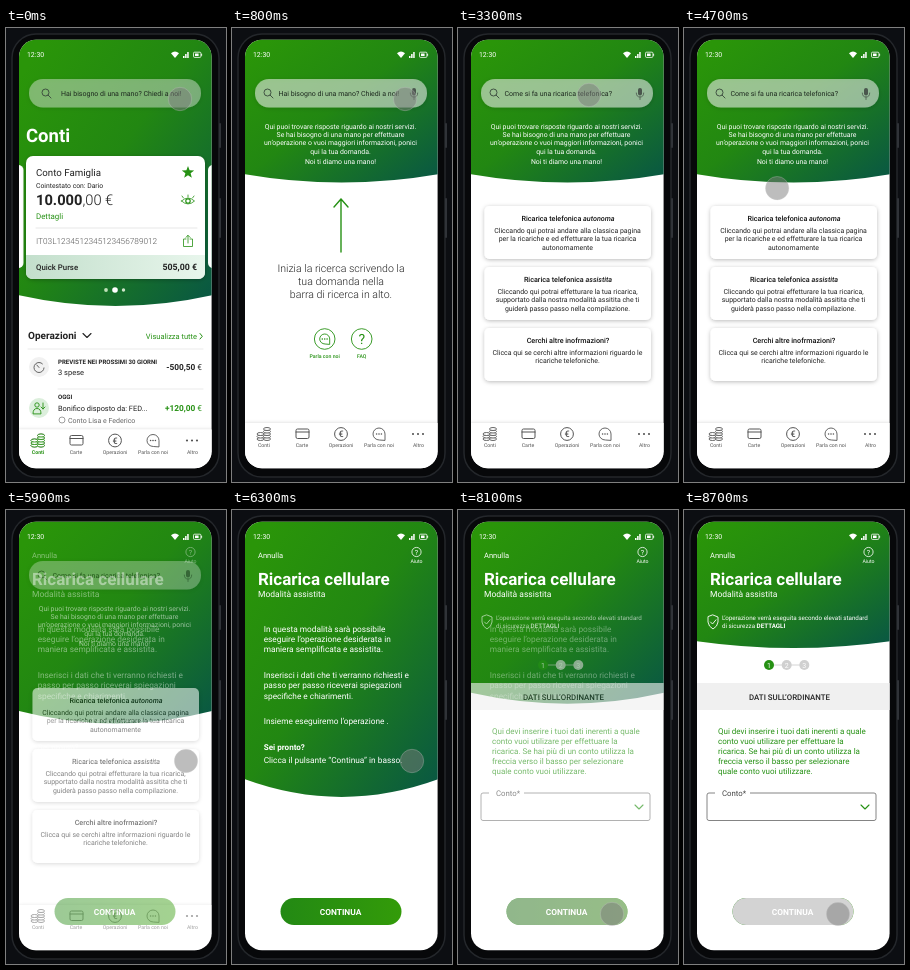
Recreate the animation shown at these times as an HTML page. Size 220 by 454 pixels, loop 8.8 s.

```html
<!DOCTYPE html>
<html lang="it">
<head>
<meta charset="utf-8">
<title>Ricarica cellulare</title>
<style>
html, body { margin: 0; width: 100%; height: 100%; overflow: hidden; background: #0c0e12; }
svg { display: block; width: 100vw; height: 100vh; }
text { font-family: Roboto, sans-serif; white-space: pre; text-rendering: geometricPrecision; }
</style>
</head>
<body>
<svg id="stage" viewBox="0 0 220 454"></svg>
<script>
const LOOP = 8800;
const GREEN = '#269114', INK = '#222';

// Markup helpers
const text = (x, y, size, str, fill = INK, weight = 400, anchor = 'start', extra = '') =>
  `<text x="${x}" y="${y}" font-size="${size}" fill="${fill}" font-weight="${weight}" text-anchor="${anchor}" ${extra}>${str}</text>`;
const lines = (x, y, step, size, rows, fill, weight, anchor) =>
  rows.map((row, i) => text(x, y + i * step, size, row, fill, weight, anchor)).join('');
const rect = (x, y, w, h, r, fill, extra = '') =>
  `<rect x="${x}" y="${y}" width="${w}" height="${h}" rx="${r}" fill="${fill}" ${extra}/>`;
const circle = (x, y, r, fill, extra = '') => `<circle cx="${x}" cy="${y}" r="${r}" fill="${fill}" ${extra}/>`;
const line = (d, color, w = 1) =>
  `<path d="${d}" fill="none" stroke="${color}" stroke-width="${w}" stroke-linecap="round" stroke-linejoin="round"/>`;
const group = (id, body) => `<g id="${id}">${body}</g>`;
const at = (x, y, body) => `<g transform="translate(${x} ${y})">${body}</g>`;
const bold = s => `<tspan font-weight="700">${s}</tspan>`;
const italic = s => `<tspan font-style="italic">${s}</tspan>`;

// Icons
const chat = (x, y, c, r = 6) => at(x, y,
  line(`M${r} ${r} L${r} 0 A${r} ${r} 0 1 0 0 ${r} Z`, c, .9) +
  [-2.4, 0, 2.4].map(dx => circle(dx, 0, .8, c)).join(''));
const coins = (x, y, c) => at(x, y, [[-3.5, 5], [-3.5, 2.5], [-3.5, 0], [3, 5], [3, 2.5], [3, 0], [3, -2.5], [3, -5]]
  .map(([dx, dy]) => `<ellipse cx="${dx}" cy="${dy}" rx="3.5" ry="1.5" fill="#fff" stroke="${c}" stroke-width=".9"/>`).join(''));
const chevron = (x, y, c, s = 4) => line(`M${x - s} ${y - s / 2} L${x} ${y + s / 2} L${x + s} ${y - s / 2}`, c, 1.1);
const star = (x, y, r) => {
  const pts = Array.from({ length: 10 }, (_, i) => {
    const a = i * Math.PI / 5 - Math.PI / 2, q = i % 2 ? r * .42 : r;
    return `${x + q * Math.cos(a)},${y + q * Math.sin(a)}`;
  });
  return `<polygon points="${pts.join(' ')}" fill="${GREEN}"/>`;
};
const eye = (x, y) => at(x, y,
  line('M-6.5 0 Q0 -6 6.5 0 Q0 6 -6.5 0 Z M-4.5 -3 L-6 -5 M0 -4 V-6 M4.5 -3 L6 -5', GREEN, .8) +
  circle(0, 0, 2.2, 'none', `stroke="${GREEN}" stroke-width="1.2"`));
const glass = (x, y) => circle(x - 1, y - 1, 3.5, 'none', 'stroke="#38483c" stroke-width=".9"') +
  line(`M${x + 1.6} ${y + 1.6} L${x + 4.5} ${y + 4.5}`, '#38483c', .9);

const status = text(21, 29.3, 6.9, '12:30', '#fff') +
  '<path d="M165 25.3 Q169 21.8 173 25.3 L169 30 Z" fill="#fff"/>' +
  [0, 1, 2].map(i => rect(177 + i * 2.1, 28 - i * 2, 1.5, 2 + i * 2, 0, '#fff')).join('') +
  rect(187.5, 24.2, 7.4, 5.2, 1, 'none', 'stroke="#fff" stroke-width=".8"') +
  rect(189, 25.5, 3.6, 2.6, .3, '#fff') + rect(195.2, 25.8, .9, 2, 0, '#fff');

const home =
  text(20, 114, 18.5, 'Conti', '#fff', 700) +
  rect(6, 137, 11.5, 103, 5, '#fff') + rect(202, 137, 12, 103, 5, '#fff') +
  rect(20, 128, 179, 123, 7, '#fff', 'filter="url(#shadow)"') +
  '<path d="M20 227 H199 V244 Q199 251 192 251 H27 Q20 251 20 244 Z" fill="url(#strip)"/>' +
  text(30, 148, 9.7, 'Conto Famiglia') +
  text(30, 160, 6.8, 'Cointestato con: Dario') +
  text(30, 177, 14.7, bold('10.000') + ',00 €', INK, 300) +
  text(30, 191, 7.9, 'Dettagli', GREEN) +
  line('M30 200 H191', '#ddd', .7) +
  text(30, 216, 8.25, 'IT03L1234512345123456789012', '#555', 300) +
  text(30, 242, 7.8, 'Quick Purse', INK, 500) +
  text(191, 242, 8.8, '505,00 €', INK, 700, 'end') +
  star(182, 144.5, 6.5) + eye(182, 173) +
  line('M180 211 H177.5 V218.5 H186.5 V211 H184 M182 215 V207.5 M179.8 209.5 L182 207.3 L184.2 209.5', GREEN, .8) +
  circle(100, 262, 1.9, '#bfe0b8') + circle(109, 262, 2.8, '#fff') + circle(117.5, 262, 1.7, '#cfe6ca') +
  text(22, 311, 10, 'Operazioni', INK, 700) + chevron(81, 307.5, INK) +
  text(191, 311, 7.5, 'Visualizza tutte', GREEN, 400, 'end') +
  line('M194 305.5 L196.3 308.3 L194 311', GREEN) +
  line('M22 321 H197 M52 361 H197', '#e3e3e3', .7) +
  circle(33, 339, 10, '#f1f1f1') + circle(33, 339.5, 5, 'none', 'stroke="#555" stroke-width=".9" stroke-dasharray="27 4"') +
  line('M33 339.5 L30.8 337', '#555', .9) +
  text(52, 336, 6.1, 'PREVISTE NEI PROSSIMI 30 GIORNI', INK, 700) +
  text(52, 347, 7.5, '3 spese') + text(196, 342, 8.3, bold('-500,50') + ' €', INK, 400, 'end') +
  circle(33, 380, 10, '#dcefdc') + circle(31, 377, 2.2, 'none', `stroke="${GREEN}" stroke-width=".9"`) +
  line('M27 385.5 Q27 380.5 31 380.5 Q35 380.5 35 385.5 Z M37 375 V381 M35 379 L37 381 L39 379', GREEN, .9) +
  text(52, 371, 6.1, 'OGGI', INK, 700) +
  text(52, 383, 7.4, 'Bonifico disposto da: FED...') +
  text(196, 383, 8.3, bold('+120,00') + ' €', GREEN, 400, 'end') +
  circle(56, 392, 3, 'none', 'stroke="#888" stroke-width=".8"') + text(62, 395, 7, 'Conto Lisa e Federico', '#666');

const intro = lines(108.5, 100.5, 8.4, 6.9, ['Qui puoi trovare risposte riguardo ai nostri servizi.',
  'Se hai bisogno di una mano per effettuare', 'un’operazione o vuoi maggiori informazioni, ponici',
  'qui la tua domanda.'], '#fff', 400, 'middle') + text(108.5, 135.5, 6.9, 'Noi ti diamo una mano!', '#fff', 400, 'middle');

const hint = line('M109 224 V171 M102 179 L109 171 L116 179', GREEN, 1.4) +
  lines(109, 243.5, 13, 10.6, ['Inizia la ricerca scrivendo la', 'tua domanda nella', 'barra di ricerca in alto.'], INK, 300, 'middle') +
  [92.7, 129.7].map(x => circle(x, 311, 10.3, '#fff', `stroke="${GREEN}" stroke-width=".9"`)).join('') +
  chat(92.7, 311, GREEN, 5) + text(129.7, 316, 14, '?', GREEN, 400, 'middle') +
  text(92.7, 330, 5.2, 'Parla con noi', GREEN, 500, 'middle') + text(129.7, 330, 5.2, 'FAQ', GREEN, 500, 'middle');

const recent = rect(23, 80, 170.5, 88, 8, 'url(#drop)', 'filter="url(#shadow)"') +
  text(40, 94.3, 6.8, 'Ricerche recenti', '#111', 700) +
  ['Come fare un bonifico?', 'Quali sono gli orari della filiare di Roma?', 'Quali operazioni posso efettuare in filiare?']
    .map((s, i) => text(39.5, 111 + i * 21.5, 6.9, s, '#111', 400, 'start', 'font-style="italic" text-decoration="underline"')).join('');

const card = (y, title, rows) => rect(26.5, y, 166.5, 53, 5, '#fff', 'filter="url(#shadow)"') +
  text(110, y + 14.5, 7.2, title, '#111', 500, 'middle') + lines(109.5, y + 27, 8.3, 6.95, rows, INK, 400, 'middle');
const cards =
  card(178, 'Ricarica telefonica ' + italic('autonoma'),
    ['Cliccando qui potrai andare alla classica pagina', 'per la ricariche e ed effetturare la tua ricarica', 'autonomamente']) +
  card(239, 'Ricarica telefonica ' + italic('assistita'),
    ['Cliccando qui potrai effetturare la tua ricarica,', 'supportato dalla nostra modalità assitita che ti', 'guiderà passo passo nella compilazione.']) +
  card(300, 'Cerchi altre inofrmazioni?', ['Clicca qui se cerchi altre informazioni riguardo le', 'ricariche telefoniche.']);

const bar = rect(23, 51, 172, 28.5, 14, '#e9efe9', 'id="pill" filter="url(#shadow)"') +
  group('lens', glass(36.5, 65.5)) +
  group('mic', rect(180, 60, 4, 7.5, 2, '#4a564d') + line('M178.3 65 Q178.3 69 182 69 Q185.7 69 185.7 65 M182 69 V71.5', '#4a564d', .8)) +
  group('ask', text(46.5, 67.8, 7, 'Hai bisogno di una mano? Chiedi a noi!', '#1d291f')) +
  group('query', text(46.5, 67.8, 7, 'Come si fa una ricarica telefonica?', '#1d291f'));

const label = (x, s, c = '#555', w = 400) => text(x, 419, 5.2, s, c, w, 'middle');
const nav = rect(12, 395, 195, 60, 0, '#fff', 'filter="url(#shadow)"') + coins(32, 406, '#555') +
  group('active', coins(32, 406, GREEN) + label(32, 'Conti', GREEN, 700)) +
  rect(64, 401, 13, 9.5, 1.5, 'none', 'stroke="#555" stroke-width="1"') + line('M64 404 H77', '#555', 1.2) +
  circle(109, 406, 6.4, 'none', 'stroke="#555" stroke-width="1"') + text(109, 409.3, 9, '€', '#555', 500, 'middle') +
  chat(147, 406, '#555') + [181, 186, 191].map(x => circle(x, 406, 1.1, '#555')).join('') +
  group('idle', label(32, 'Conti')) + label(70, 'Carte') + label(109, 'Operazioni') + label(147, 'Parla con noi') + label(186.5, 'Altro');

const head = text(26, 48, 7.5, 'Annulla', '#fff') +
  circle(184.5, 42, 4.6, 'none', 'stroke="#fff" stroke-width=".8"') + text(184.5, 44.6, 7, '?', '#fff', 400, 'middle') +
  text(184.5, 53, 5.2, 'Aiuto', '#fff', 400, 'middle') +
  text(26, 75, 17, 'Ricarica cellulare', '#fff', 700) + text(26, 87.3, 8.5, 'Modalità assistita', '#fff') +
  rect(48.5, 388, 121, 27, 13.5, 'url(#go)') + rect(48.5, 388, 121, 27, 13.5, '#d3d3d3', 'id="off"') +
  text(108.5, 404.6, 8.4, 'CONTINUA', '#fff', 700, 'middle');

const guide = lines(31.7, 122, 10.2, 8.3, ['In questa modalità sarà possibile', 'eseguire l’operazione desiderata in', 'maniera semplificata e assistita.'], '#fff') +
  lines(31.7, 168, 10.3, 8.3, ['Inserisci i dati che ti verranno richiesti e', 'passo per passo riceverai spiegazioni', 'specifiche e chiarimenti.'], '#fff') +
  text(31.7, 214, 8.3, 'Insieme eseguiremo l’operazione .', '#fff') +
  text(31.7, 240, 8.1, 'Sei pronto?', '#fff', 700) + text(31.7, 253, 8.3, 'Clicca il pulsante “Continua” in basso.', '#fff');

const form = at(29, 112, line('M0 -7 L5 -5 V0 Q4.5 4.5 0 7 Q-4.5 4.5 -5 0 V-5 Z M-2.5 0 L-.5 2 L3 -2.2', '#fff', .9)) +
  text(38, 110, 6.25, 'L’operazione verrà eseguita secondo elevati standard', '#fff') +
  text(38, 117.5, 6.25, 'di sicurezza ' + bold('DETTAGLI'), '#fff') +
  line('M90 155 H116', '#c9c9c9', .8) +
  [85, 102.7, 120.3].map((x, i) => circle(x, 155, 5, i ? '#d0d0d0' : GREEN) + text(x, 157.5, 7, i + 1, '#fff', 400, 'middle')).join('') +
  rect(12, 173, 195, 27, 0, '#f0f0f0') + text(105.5, 189.5, 7.85, 'DATI SULL’ORDINANTE', INK, 500, 'middle') +
  lines(34, 224, 9.9, 8, ['Qui devi inserire i tuoi dati inerenti a quale', 'conto vuoi utilizare per effettuare la',
    'ricarica. Se hai più di un conto utilizza la', 'freccia verso il basso per selezionare',
    'quale conto vuoi utilizzare.'], GREEN) +
  rect(23, 283, 169, 27.5, 2, '#fff', 'stroke="#777" stroke-width=".9"') + rect(31, 281, 35, 4, 0, '#fff') +
  text(38, 286, 7.8, 'Conto*', '#444') + chevron(181, 297, GREEN);

const stop = (o, c) => `<stop offset="${o}" stop-color="${c}"/>`;
const grad = (id, dir, ...stops) => `<linearGradient id="${id}" ${dir}>${stops.join('')}</linearGradient>`;
document.getElementById('stage').innerHTML = `<defs>
  ${grad('green', 'x1=".1" y1=".05" x2="1" y2=".92"', stop(0, '#2a9509'), stop(.45, '#228712'), stop(1, '#0a5941'))}
  ${grad('strip', '', stop(0, '#c3dfcc'), stop(1, '#e8f6ec'))}
  ${grad('drop', 'x1="0" y1="0" x2=".15" y2="1"', stop(0, '#c6dfc6'), stop(.7, '#cfe5d4'), stop(1, '#e6f3ea'))}
  ${grad('go', '', stop(0, '#238914'), stop(1, '#339b09'))}
  <clipPath id="screen"><rect x="13" y="11.7" width="192.6" height="428.6" rx="17"/></clipPath>
  <filter id="shadow" x="-10%" y="-30%" width="120%" height="170%"><feDropShadow dx="0" dy="1" stdDeviation="2" flood-opacity=".27"/></filter></defs>` +
  rect(0, 0, 220, 454, 0, '#0c0e12') + rect(6, 6, 207, 443, 24, '#07080a', 'stroke="#24272b" stroke-width="1.5"') +
  rect(213, 95, 2, 25, 1, '#303338') + rect(213, 170, 2, 40, 1, '#303338') +
  `<g clip-path="url(#screen)">${rect(12, 10, 195, 432, 0, '#fff')}<path id="hero" fill="url(#green)"/>` +
  status + group('home', home) + group('intro', intro) + group('hint', hint) + group('cards', cards) +
  group('recent', recent) + group('bar', bar) + group('nav', nav) +
  group('head', head) + group('guide', guide) + group('form', form) +
  circle(0, 0, 11.7, '#7c7c7c', 'id="touch" fill-opacity=".5" stroke="#d5d5d5" stroke-opacity=".35" stroke-width=".8"') + '</g>';

const el = {};
document.querySelectorAll('#stage [id]').forEach(n => el[n.id] = n);

// time, x, y of the touch point
const path = [[0, 174, 71], [900, 173, 71], [1700, 151, 65], [2300, 150, 65], [3300, 131, 67], [3600, 118, 66], [3900, 98, 62],
  [4500, 98, 135], [4700, 93, 160], [5250, 174, 258], [5500, 180, 251], [6350, 180, 251], [7100, 165, 391], [7200, 154, 404], [LOOP, 154, 404]];

const ease = (t, a, b) => {
  const u = Math.min(1, Math.max(0, (t - a) / (b - a)));
  return u * u * (3 - 2 * u);
};
const mix = (a, b, u) => a + (b - a) * u;
const show = (id, a) => {
  el[id].setAttribute('opacity', a);
  el[id].style.display = a > 0 ? '' : 'none';
};

function draw(t) {
  const search = ease(t, 250, 750), open = ease(t, 1400, 1800), found = ease(t, 2750, 3200);
  const assist = ease(t, 5600, 6250), data = ease(t, 7750, 8350);
  const level = (a, b, c, d) => mix(mix(mix(a, b, search), c, assist), d, data);
  const edge = level(267, 146, 269, 131), sag = level(11, 8.5, 18, 7);
  el.hero.setAttribute('d', `M12 10 H207 V${edge} Q109.5 ${edge + 2 * sag} 12 ${edge} Z`);

  show('home', 1 - search);
  show('intro', search * (1 - open * (1 - found)) * (1 - assist));
  show('hint', search * (1 - found));
  show('recent', open * (1 - found));
  show('cards', found * (1 - assist));
  show('bar', 1 - assist);
  show('nav', 1 - assist);
  show('mic', search);
  show('ask', 1 - found);
  show('query', found);
  show('active', 1 - search);
  show('idle', search);
  show('head', assist);
  show('guide', assist * (1 - data));
  show('form', data);
  show('off', data);

  el.pill.setAttribute('fill-opacity', mix(.42, .56, search));
  el.lens.setAttribute('transform', `translate(${mix(4, 0, search)} 0)`);
  el.ask.setAttribute('transform', `translate(${mix(8.5, 0, search)} 0)`);
  el.nav.setAttribute('transform', `translate(0 ${mix(6.5, 0, search)})`);

  const i = path.findIndex(p => p[0] > t), [t0, x0, y0] = path[i - 1], [t1, x1, y1] = path[i];
  const u = (t - t0) / (t1 - t0);
  el.touch.setAttribute('transform', `translate(${mix(x0, x1, u)} ${mix(y0, y1, u)})`);
}

const start = performance.now();
function tick() {
  draw((performance.now() - start) % LOOP);
  requestAnimationFrame(tick);
}
tick();
</script>
</body>
</html>
```
